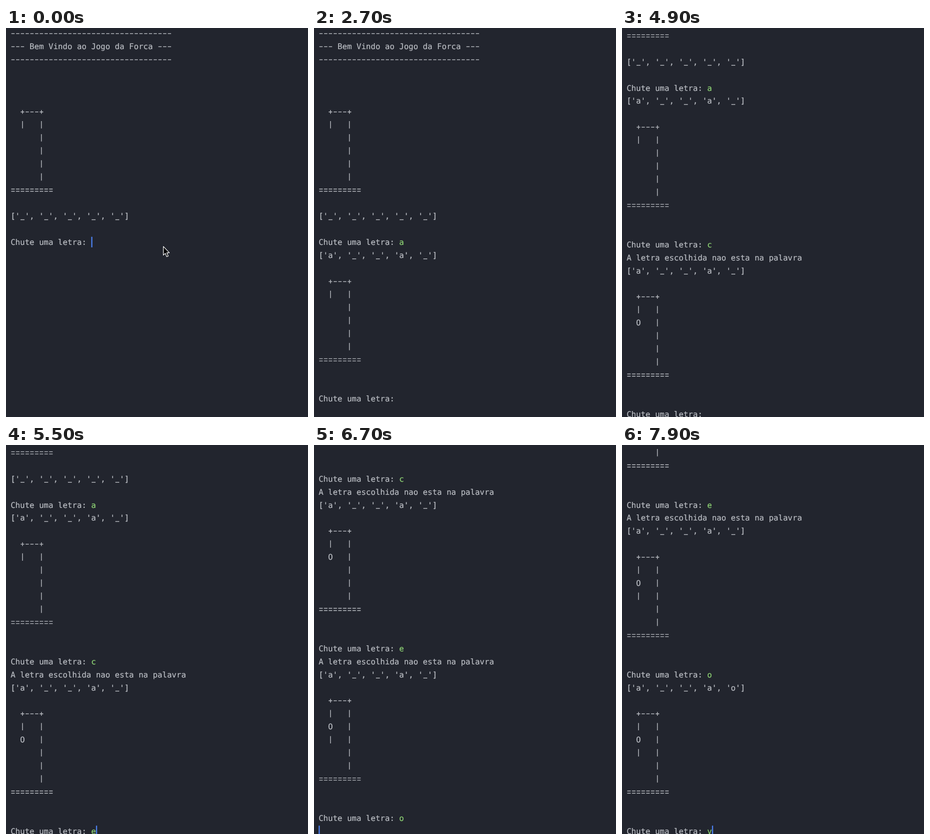
An HTML page that plays this animation: 600 by 773 pixels, repeating every 8 s.

```html
<!DOCTYPE html>
<html lang="pt">
<head>
<meta charset="utf-8">
<title>Jogo da Forca</title>
<style>
  html, body { margin: 0; width: 100%; height: 100%; overflow: hidden; background: #22252e; }
  svg { display: block; width: 600px; height: 773px; }
  text {
    font: 15.65px "DejaVu Sans Mono", "Liberation Mono", monospace;
    white-space: pre;
    text-rendering: geometricPrecision;
    fill: #bbbec4;
    stroke: #bbbec4;
    stroke-width: .2;
  }
  path.rule { fill: none; stroke: #bbbec4; stroke-width: 1.4; }
  text.key { fill: #8ed374; stroke: #8ed374; }
  #caret { fill: #4c80ee; }
</style>
</head>
<body>
<svg viewBox="0 0 600 773">
  <g id="page"><rect id="caret" width="2.3" height="21"/></g>
  <path id="mouse" d="M312.6 434.2V451.4L316.5 447.8L319.3 454.5L322.3 453.2L319.5 446.7H324.6Z"
        fill="#000" stroke="#fff" stroke-width="1.2" stroke-linejoin="round"/>
</svg>
<script>
const LOOP = 8000, LEFT = 9.2, CELL = 9.42, PITCH = 25.93, BASE = 16.4, LAST_TOP = 756.4;
const PROMPT = 'Chute uma letra: ';

// Times: letter typed, Enter pressed, answer printed.
const rounds = [
  { key: 'a', typed: 700, enter: 1200, out: 1300, word: 'a__a_', misses: 0 },
  { key: 'c', typed: 3700, enter: 4100, out: 4200, word: 'a__a_', misses: 1, miss: true },
  { key: 'e', typed: 5200, enter: 5600, out: 5700, word: 'a__a_', misses: 2, miss: true },
  { key: 'o', typed: 6300, enter: 6700, out: 6800, word: 'a__ao', misses: 2 },
  { key: 'v', typed: 7900 }
];
const caretOff = [[200, 700], [1700, 2200], [2700, 3200], [4700, 5200], [6200, 6300], [7200, 7700]];

// Line-like characters, as strokes within one cell.
const strokes = {
  '-': 'M1.5 11.2H7.9',
  '|': 'M4.7 3.5V18.1',
  '_': 'M.8 17.9H8.6',
  '=': 'M1.2 8.9H8.2M1.2 13.4H8.2',
  '+': 'M1.1 11.2H8.3M4.7 7.5V14.9'
};

const page = document.getElementById('page');
const caret = document.getElementById('caret');
const mouse = document.getElementById('mouse');
const timed = [];
const caretStops = [];
let row = 0;

function add(tag, attrs, at) {
  const el = document.createElementNS('http://www.w3.org/2000/svg', tag);
  for (const name in attrs) el.setAttribute(name, attrs[name]);
  page.insertBefore(el, caret);
  timed.push({ el, at });
  return el;
}

function write(str, line, col, at, cls = '') {
  const x = LEFT + col * CELL, y = line * PITCH;
  const letters = str.replace(/[-|_=+]/g, ' ');
  if (letters.trim()) add('text', { x, y: y + BASE, class: cls }, at).textContent = letters;
  [...str].forEach((ch, i) => {
    if (strokes[ch]) {
      add('path', { d: strokes[ch], class: 'rule', transform: `translate(${x + i * CELL} ${y})` }, at);
    }
  });
}

const print = (lines, at) => lines.forEach(line => write(line, row++, 0, at));
const list = word => '[' + [...word].map(c => `'${c}'`).join(', ') + ']';
const gallows = misses => [
  '  +---+',
  '  |   |',
  `  ${misses > 0 ? 'O' : ' '}   |`,
  `  ${misses > 1 ? '|' : ' '}   |`,
  '      |',
  '      |',
  '========='
];

function prompt(at) {
  caretStops.push({ at, row, col: PROMPT.length });
  print([PROMPT], at);
}

const bar = '-'.repeat(34);
print([bar, '--- Bem Vindo ao Jogo da Forca ---', bar, '', '', '',
  ...gallows(0), '', list('_____'), ''], 0);
prompt(0);
for (const r of rounds) {
  write(r.key, row - 1, PROMPT.length, r.typed, 'key');
  caretStops.push({ at: r.typed, row: row - 1, col: PROMPT.length + 1 });
  if (!r.out) break;
  caretStops.push({ at: r.enter, row, col: 0 });
  if (r.miss) print(['A letra escolhida nao esta na palavra'], r.out);
  print([list(r.word), '', ...gallows(r.misses), '', ''], r.out);
  prompt(r.out);
}

const show = (el, on) => el.setAttribute('visibility', on ? 'visible' : 'hidden');

function draw(t) {
  for (const item of timed) show(item.el, t >= item.at);
  const stop = caretStops.filter(s => s.at <= t).pop();
  const y = stop.row * PITCH;
  caret.setAttribute('x', LEFT + stop.col * CELL);
  caret.setAttribute('y', y);
  show(caret, !caretOff.some(([from, to]) => t >= from && t < to));
  show(mouse, t < rounds[0].typed);
  page.setAttribute('transform', `translate(0 ${-Math.max(0, y - LAST_TOP)})`);
}

const start = performance.now();
function tick() {
  draw((performance.now() - start) % LOOP);
  requestAnimationFrame(tick);
}
tick();
</script>
</body>
</html>
```
